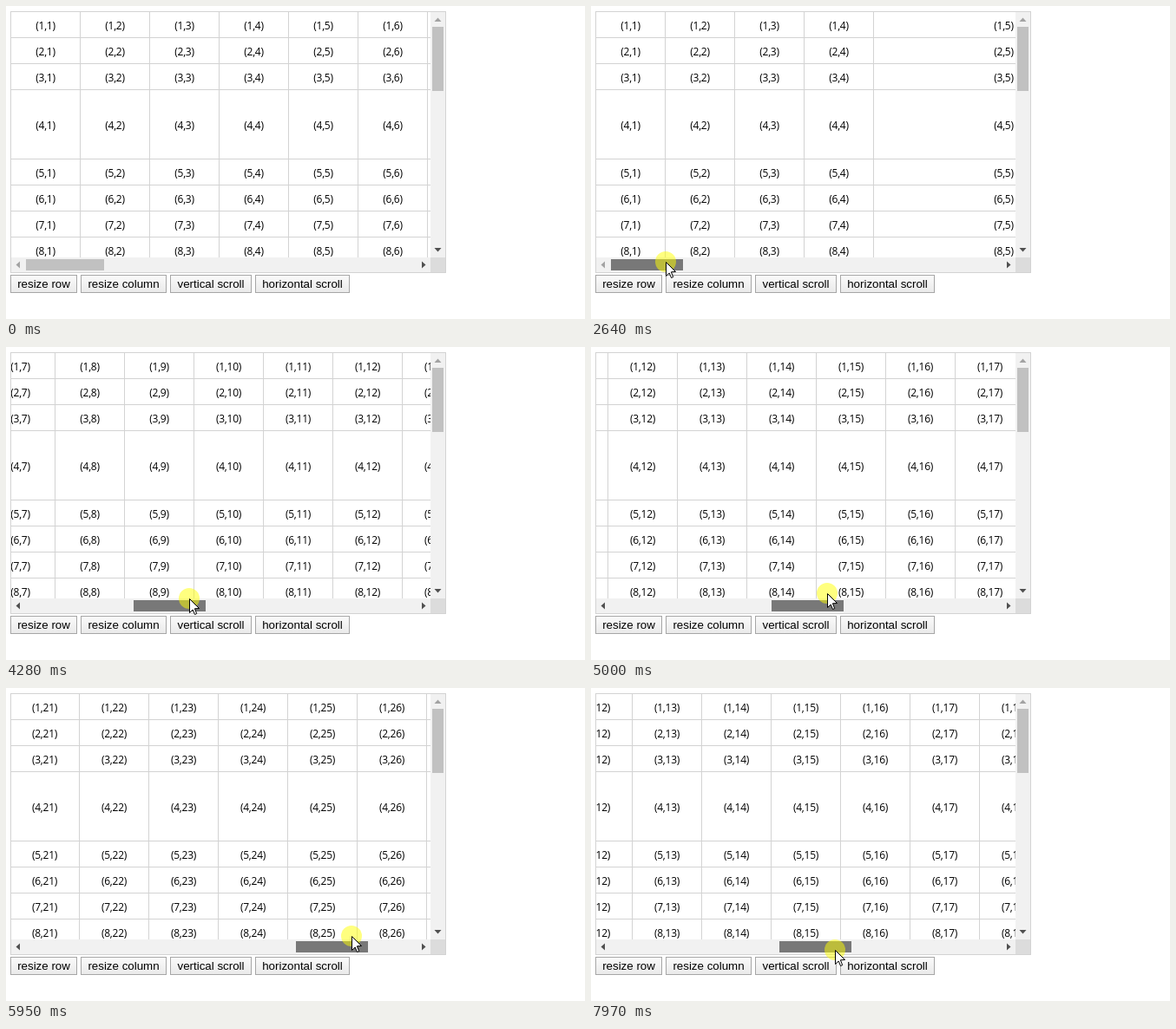
Animation of 667 by 361 pixels, one loop 8000 ms. Source, as an HTML page with a canvas:

```html
<!DOCTYPE html>
<html lang="en">
<head>
<meta charset="utf-8">
<title>Grid scrolling</title>
<style>
  html, body { margin: 0; width: 100%; height: 100%; overflow: hidden; background: #fff; }
  canvas { display: block; width: 667px; height: 361px; }
</style>
</head>
<body>
<canvas id="stage"></canvas>
<script>
const W = 667, H = 361, LOOP = 8000;
const canvas = document.getElementById('stage');
const ctx = canvas.getContext('2d');
const dpr = window.devicePixelRatio || 1;
canvas.width = W * dpr;
canvas.height = H * dpr;

// Grid viewport and scrollbar metrics
const LEFT = 6, TOP = 7, VIEW_W = 483, VIEW_H = 283, BAR = 17;
const RIGHT = LEFT + VIEW_W, BOTTOM = TOP + VIEW_H;
const COLS = 30;
const LINE = '#d3d3d3';

// The screen refreshes in even steps
const FIRST = 56, STEP = 78;
const PRESS_AT = 1460, RESIZE_AT = 1538, GRAB_AT = 2630;

// Pointer moves, each from the previous resting place
const ENTRY = { x: 502, y: 350 }, GRAB_X = 86;
const MOVES = [
  { from: FIRST, to: 980, x: 143, y: 321 },
  { from: 1960, to: 2460, x: GRAB_X, y: 295 },
  { from: 2720, to: 3566, x: 149, y: 295 },
  { from: 3566, to: 4970, x: 272, y: 284 },
  { from: 4970, to: 5906, x: 398, y: 286 },
  { from: 5906, to: 6600, x: 467, y: 287 },
  { from: 6998, to: 7934, x: 281, y: 302 }
];

const BUTTONS = [
  { label: 'resize row', w: 77 },
  { label: 'resize column', w: 99 },
  { label: 'vertical scroll', w: 94 },
  { label: 'horizontal scroll', w: 109 }
];

const easeOut = u => 1 - (1 - u) ** 2;

function snap(t) {
  return t < FIRST ? 0 : FIRST + Math.floor((t - FIRST) / STEP) * STEP;
}

function pointerAt(t) {
  let { x, y } = ENTRY;
  for (const move of MOVES) {
    if (t < move.from) break;
    const u = Math.min(1, (t - move.from) / (move.to - move.from));
    const k = move.from < GRAB_AT ? easeOut(u) : u;
    x += (move.x - x) * k;
    y += (move.y - y) * k;
  }
  return { x: Math.round(x), y: Math.round(y) };
}

function rect(color, x, y, w, h) {
  ctx.fillStyle = color;
  ctx.fillRect(x, y, w, h);
}

function poly(color, points) {
  ctx.fillStyle = color;
  ctx.beginPath();
  points.forEach(([x, y]) => ctx.lineTo(x, y));
  ctx.closePath();
  ctx.fill();
}

const colWidth = (c, wide) => wide && c === 5 ? 300 : 80;
const rowHeight = r => r === 4 ? 80 : 30;

function drawGrid(scroll, wide) {
  ctx.save();
  ctx.beginPath();
  ctx.rect(LEFT, TOP, VIEW_W, VIEW_H);
  ctx.clip();
  ctx.font = '12px "Open Sans", "Noto Sans", sans-serif';
  ctx.letterSpacing = '-0.25px';
  ctx.textAlign = 'center';
  let x = LEFT - scroll;
  for (let c = 1; c <= COLS; c++) {
    const w = colWidth(c, wide);
    if (x + w > LEFT && x < RIGHT) {
      rect(LINE, x + w - 1, TOP, 1, VIEW_H);
      ctx.fillStyle = '#000';
      for (let r = 1, y = TOP; y < BOTTOM; y += rowHeight(r++)) {
        ctx.fillText(`(${r},${c})`, x + (w - 1) / 2, y + (rowHeight(r) - 1) / 2 + 5.5);
      }
    }
    x += w;
  }
  for (let r = 1, y = TOP; y < BOTTOM; r++) {
    y += rowHeight(r);
    rect(LINE, LEFT, y - 1, VIEW_W, 1);
  }
  ctx.restore();
}

function drawArrow(x, y, angle, disabled) {
  ctx.save();
  ctx.translate(x, y);
  ctx.rotate(angle);
  poly(disabled ? '#a3a3a3' : '#505050', [[-2.5, 0], [2, -4], [2, 4]]);
  ctx.restore();
}

function drawBars(thumbX, thumbW, thumbColor, atStart, atEnd) {
  const midX = RIGHT + 8.5, midY = BOTTOM + 8.5;
  rect('#f1f1f1', RIGHT, TOP, BAR, VIEW_H);
  rect('#f1f1f1', LEFT, BOTTOM, VIEW_W, BAR);
  rect('#dcdcdc', RIGHT, BOTTOM, BAR, BAR);
  rect('#c1c1c1', RIGHT + 2, TOP + BAR, 13, 74);
  rect(thumbColor, thumbX, BOTTOM + 2, thumbW, 13);
  drawArrow(midX, TOP + 9, Math.PI / 2, true);
  drawArrow(midX, BOTTOM - 9, -Math.PI / 2, false);
  drawArrow(LEFT + 8, midY, 0, atStart);
  drawArrow(RIGHT - 8, midY, Math.PI, atEnd);
}

function drawButton(x, w, label, hover, pressed) {
  const y = 310, h = 21;
  const shade = ctx.createLinearGradient(0, y, 0, y + h);
  shade.addColorStop(0, pressed ? '#dcdcdc' : '#fbfbfb');
  shade.addColorStop(1, pressed ? '#f0f0f0' : '#e9e9e9');
  rect(hover ? '#7b7b7b' : '#a6a6a6', x, y, w, h);
  rect(shade, x + 1, y + 1, w - 2, h - 2);
  ctx.font = '13.333px "Liberation Sans", Arial, sans-serif';
  ctx.textAlign = 'center';
  ctx.fillStyle = '#000';
  ctx.fillText(label, x + w / 2, y + 15);
}

function drawPointer(x, y, clicked) {
  if (clicked) {
    ctx.fillStyle = 'rgba(255, 255, 0, 0.5)';
    ctx.beginPath();
    ctx.arc(x, y, 12, 0, Math.PI * 2);
    ctx.fill();
  }
  ctx.save();
  ctx.translate(x, y);
  poly('#fff', [[0.5, 0.5], [0.5, 16.5], [4.2, 13], [6.5, 18.5], [8.7, 17.6],
    [6.4, 11.8], [11.5, 11.5]]);
  ctx.strokeStyle = '#000';
  ctx.lineWidth = 1;
  ctx.stroke();
  ctx.restore();
}

function draw(time) {
  const t = snap(time);
  const wide = t >= RESIZE_AT, grabbed = t >= GRAB_AT;
  const pressing = t >= PRESS_AT && !wide;
  const { x, y } = pointerAt(t);

  const contentW = COLS * 80 + (wide ? 220 : 0);
  const range = contentW - VIEW_W;
  const track = VIEW_W - 2 * BAR;
  const thumbW = Math.round(track * VIEW_W / contentW);
  const slack = track - thumbW;
  const drag = grabbed ? Math.max(0, Math.min(x - GRAB_X, slack)) : 0;
  const scroll = Math.floor(drag * range / slack);
  const thumbX = LEFT + BAR + Math.floor(scroll * slack / range);
  const onThumb = y >= 292 && y < 305 && x >= thumbX && x < thumbX + thumbW;

  ctx.setTransform(dpr, 0, 0, dpr, 0, 0);
  rect('#fff', 0, 0, W, H);
  rect(LINE, LEFT - 1, TOP - 1, 502, 302);
  rect('#fff', LEFT, TOP, 500, 300);
  drawGrid(scroll, wide);
  const thumbColor = grabbed ? '#787878' : onThumb ? '#a8a8a8' : '#c1c1c1';
  drawBars(thumbX, thumbW, thumbColor, scroll === 0, scroll === range);

  let left = 5;
  for (const { label, w } of BUTTONS) {
    const hover = !grabbed && x >= left && x < left + w && y >= 310 && y < 331;
    drawButton(left, w, label, hover, hover && pressing);
    left += w + 4;
  }
  if (t > 0) drawPointer(x, y, pressing || grabbed);
}

function tick() {
  draw(performance.now() % LOOP);
  requestAnimationFrame(tick);
}
tick();
</script>
</body>
</html>
```
